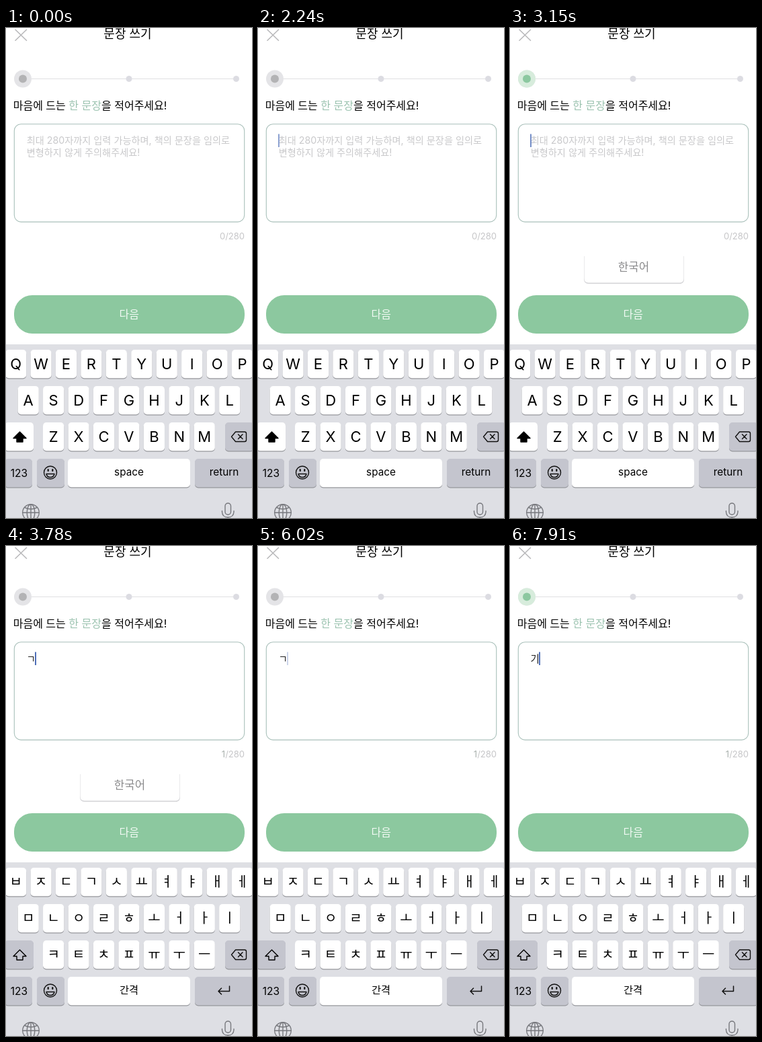
An HTML page that plays this animation: 366 by 728 pixels, repeating every 8 s.

```html
<!DOCTYPE html>
<html lang="ko">
<head>
<meta charset="utf-8">
<style>
  html, body { margin: 0; width: 100%; height: 100%; overflow: hidden; background: #fff; }
  svg { display: block; font-family: Inter, 'Noto Sans CJK KR', 'Noto Sans CJK', sans-serif; }
  .mid { text-anchor: middle; }
  .line { fill: none; stroke-linecap: round; stroke-linejoin: round; }
  .hint { font-size: 14.2px; fill: #c9c9cb; }
</style>
</head>
<body>
<svg width="366" height="728" viewBox="0 0 366 728">
  <path class="line" d="M14 2.5 30.5 18.5M30.5 2.5 14 18.5" stroke="#b8b8ba" stroke-width="1.6"/>
  <text class="mid" x="181" y="14.5" font-size="18">문장 쓰기</text>

  <path d="M25 75.5H342" stroke="#e0e0e3"/>
  <g fill="#dcdce2">
    <circle cx="183" cy="75.5" r="4.5"/>
    <circle cx="342.5" cy="75.5" r="4.5"/>
  </g>
  <circle cx="25" cy="75.5" r="13" fill="#e4e4e7"/>
  <circle cx="25" cy="75.5" r="6" fill="#b3b3b5"/>
  <g id="valid">
    <circle cx="25" cy="75.5" r="13" fill="#d7ecdc"/>
    <circle cx="25" cy="75.5" r="6" fill="#8cc8a0"/>
  </g>

  <text x="10.7" y="121" font-size="16">마음에 드는 <tspan fill="#9cc3b0">한 문장</tspan>을 적어주세요!</text>
  <rect x="12.3" y="142.7" width="342.4" height="145.4" rx="10" fill="none" stroke="#a9c0ba" stroke-width="1.1"/>
  <g id="hint" class="hint">
    <text x="30.7" y="172">최대 280자까지 입력 가능하며, 책의 문장을 임의로</text>
    <text x="30.7" y="189.5">변형하지 않게 주의해주세요!</text>
  </g>
  <text id="typed" x="30.5" y="172.5" font-size="14.5" fill="#222"></text>
  <rect id="caret" y="157.5" width="2" height="19.5" fill="#4f6fb8"/>
  <text x="355" y="313.7" font-size="13" text-anchor="end" fill="#c6c6c8"><tspan id="count"></tspan>/280</text>

  <g id="language">
    <path d="M110 339V373q0 7 7 7H252q7 0 7-7V339Z" fill="#d4d4d7"/>
    <path d="M110.5 339V372q0 6.5 6.5 6.5H252q6.5 0 6.5-6.5V339Z" fill="#fff"/>
    <text class="mid" x="184" y="361" font-size="16.8" fill="#8b8b8d">한국어</text>
  </g>

  <rect x="12" y="397" width="343" height="57" rx="27" fill="#8cc89f"/>
  <text class="mid" x="183.3" y="431" font-size="16" fill="#f2faf4">다음</text>

  <rect y="470" width="366" height="258" fill="#dedfe4"/>
  <g id="caps"></g>
  <g id="layouts" class="mid"></g>

  <path id="shift" class="line" d="M20.5 600 11 609.5H16V615H25V609.5H30Z" stroke="#000" stroke-width="1.4"/>
  <path class="line" d="M341.5 600H355q2.500 0 2.500 2.500V612q0 2.500-2.500 2.500H341.500L335.500 607.300ZM345.500 603.800 352 610.500M352 603.800 345.500 610.500" stroke="#111" stroke-width="1.4"/>
  <text class="mid" x="19.3" y="666.5" font-size="15.5">123</text>
  <g class="line" stroke="#111" stroke-width="1.4">
    <circle cx="66" cy="660.5" r="9.5"/>
    <path d="M60 662.500H72Q71 667.500 66 667.500T60 662.500Z"/>
    <path d="M62.700 656V658M69.300 656V658" stroke-width="2.200"/>
  </g>
  <g class="line" stroke="#77787d" stroke-width="1.4">
    <circle cx="37" cy="720" r="12.300"/>
    <ellipse cx="37" cy="720" rx="5.800" ry="12.300"/>
    <path d="M37 708V728M25 720H49M28 712.500Q37 717 46 712.500"/>
    <rect x="326" y="706" width="8.500" height="17" rx="4.250"/>
    <path d="M321.500 717.500V719Q322 727 330.200 727T339 719V717.500M330.200 727V728"/>
  </g>
</svg>

<script>
const LOOP = 8000;
const $ = id => document.getElementById(id);

const layouts = {
  upper: { rows: ['QWERTYUIOP', 'ASDFGHJKL', 'ZXCVBNM'], size: 22, drop: 8.2, space: 'space' },
  lower: { rows: ['qwertyuiop', 'asdfghjkl', 'zxcvbnm'], size: 24, drop: 6, space: 'space' },
  korean: { rows: ['ㅂㅈㄷㄱㅅㅛㅕㅑㅐㅔ', 'ㅁㄴㅇㄹㅎㅗㅓㅏㅣ', 'ㅋㅌㅊㅍㅠㅜㅡ'], size: 20, drop: 6.5, space: '간격' }
};
const rowStart = [14.6, 33.2, 70.6];
const keyX = (row, i) => rowStart[row] + i * 37.44;
const keyY = row => 478 + row * 54;

const GRAY = '#c4c5ce';
function cap(x, row, width, fill = '#fff', id = '') {
  const box = `x="${x}" width="${width}" height="42.3" rx="5"`;
  return `<rect ${box} y="${keyY(row) + 1.1}" fill="#96979c"/>
          <rect ${box} y="${keyY(row)}" fill="${fill}" ${id && `id="${id}"`}/>`;
}

$('caps').innerHTML =
  layouts.upper.rows.map((keys, row) =>
    [...keys].map((_, i) => cap(keyX(row, i) - 15.6, row, 31.2)).join('')).join('') +
  cap(-2, 2, 43, GRAY, 'shiftCap') + cap(326, 2, 43, GRAY) +
  cap(-2, 3, 41, GRAY) + cap(46, 3, 41, GRAY) + cap(92, 3, 182) + cap(281, 3, 88, GRAY);

const returnArrow = `<path class="line" d="M332.500 654V661.500H316M320.500 657 316 661.500 320.500 666" stroke="#111" stroke-width="1.5"/>`;
$('layouts').innerHTML = Object.entries(layouts).map(([name, { rows, size, drop, space }]) =>
  `<g id="${name}"><g font-size="${size}">` +
  rows.map((keys, row) => [...keys].map((key, i) =>
    `<text x="${keyX(row, i)}" y="${keyY(row) + 21 + drop}">${key}</text>`).join('')).join('') +
  `</g><g font-size="15.3"><text x="183" y="665.3">${space}</text>` +
  (name === 'korean' ? returnArrow : '<text x="324.500" y="665.300">return</text>') +
  '</g></g>').join('');

const typing = [[0, ''], [2310, 'R'], [2660, ''], [3570, 'ㄱ'], [4970, ''], [6020, 'ㄱ'], [6090, '기']];
const keyboards = [[0, 'upper'], [2310, 'lower'], [2660, 'upper'], [3430, 'korean']];
// Times at which a value toggles, starting from off
const caretToggles = [50, 680, 1160, 1660, 2150, 3120, 3430, 4110, 4580, 5560, 5980, 7270, 7770];
const validToggles = [2800, 3420, 4070, 5510, 6620];
const caretX = { '': 30, R: 39.8, 'ㄱ': 43, '기': 43 };

const at = (steps, t) => steps.findLast(([start]) => start <= t)[1];

function toggled(times, t, duration) {
  const last = times.findLastIndex(start => start <= t);
  if (last < 0) return 0;
  const progress = Math.min(1, (t - times[last]) / duration);
  return last % 2 ? 1 - progress : progress;
}

function draw() {
  const t = performance.now() % LOOP;
  const text = at(typing, t);
  const keyboard = at(keyboards, t);

  $('typed').textContent = text;
  $('hint').style.display = text ? 'none' : '';
  $('count').textContent = text.length;
  $('count').setAttribute('fill', text ? '#a9b1ad' : '#c6c6c8');
  $('caret').setAttribute('x', caretX[text]);
  $('caret').style.opacity = toggled(caretToggles, t, 140);
  $('valid').style.opacity = toggled(validToggles, t, 230);
  $('language').style.opacity = t < 3150 ? 0 : Math.max(0, Math.min(1, (3990 - t) / 180));

  for (const name in layouts) $(name).style.display = name === keyboard ? '' : 'none';
  const shifted = keyboard === 'upper';
  $('shiftCap').setAttribute('fill', shifted ? '#fff' : GRAY);
  $('shift').style.fill = shifted ? '#000' : 'none';
  requestAnimationFrame(draw);
}
draw();
</script>
</body>
</html>
```
